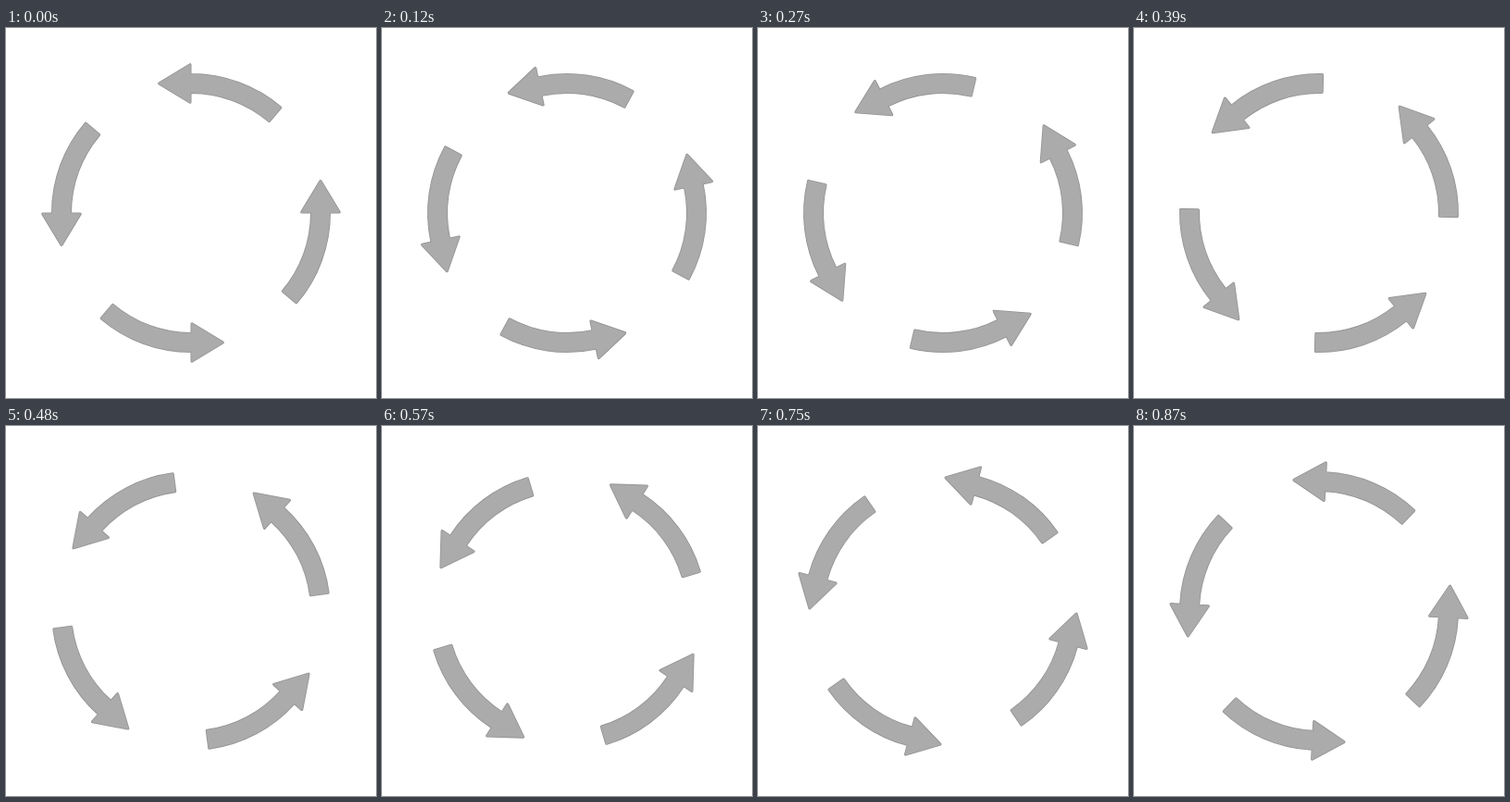
Recreate the animation shown at these times as an HTML page. Size 400 by 400 pixels, loop 900 ms.

```html
<!DOCTYPE html>
<html lang="en">
<head>
<meta charset="utf-8">
<title>Rotating arrows</title>
<style>
  html, body { margin: 0; width: 100%; height: 100%; overflow: hidden; background: #fff; }
  svg { display: block; width: 100vw; height: 100vh; }
  use { stroke-linejoin: round; }
  .edge { fill: none; stroke: #929292; stroke-width: 3; }
  .body { fill: #ababab; stroke: #ababab; stroke-width: 1.4; }
</style>
</head>
<body>
<svg viewBox="-200 -200 400 400">
  <defs><path id="arrow"/></defs>
  <g id="ring"></g>
</svg>
<script>
const LOOP = 900, STEP = 30, DEGREES = 90;
const OUTER = 149.5, INNER = 130.5, TAIL = 40.4 * Math.PI / 180;
const ring = document.getElementById('ring');

const tailPoint = r => `${r * Math.sin(TAIL)} ${-r * Math.cos(TAIL)}`;

// The head points left at the top of the ring; the shaft curves clockwise to the tail.
document.getElementById('arrow').setAttribute('d',
  `M-34.4 -140 L-1 -160.3 V${-OUTER} H0
   A${OUTER} ${OUTER} 0 0 1 ${tailPoint(OUTER)} L${tailPoint(INNER)}
   A${INNER} ${INNER} 0 0 0 0 ${-INNER} H-1 V-119.7 Z`);

ring.innerHTML = [0, 90, 180, 270].map(angle =>
  `<g transform="rotate(${angle})">
     <use href="#arrow" class="edge"/><use href="#arrow" class="body"/>
   </g>`).join('');

function draw() {
  const step = Math.floor(performance.now() % LOOP / STEP);
  ring.setAttribute('transform', `rotate(${-step * DEGREES * STEP / LOOP})`);
  requestAnimationFrame(draw);
}
draw();
</script>
</body>
</html>
```
